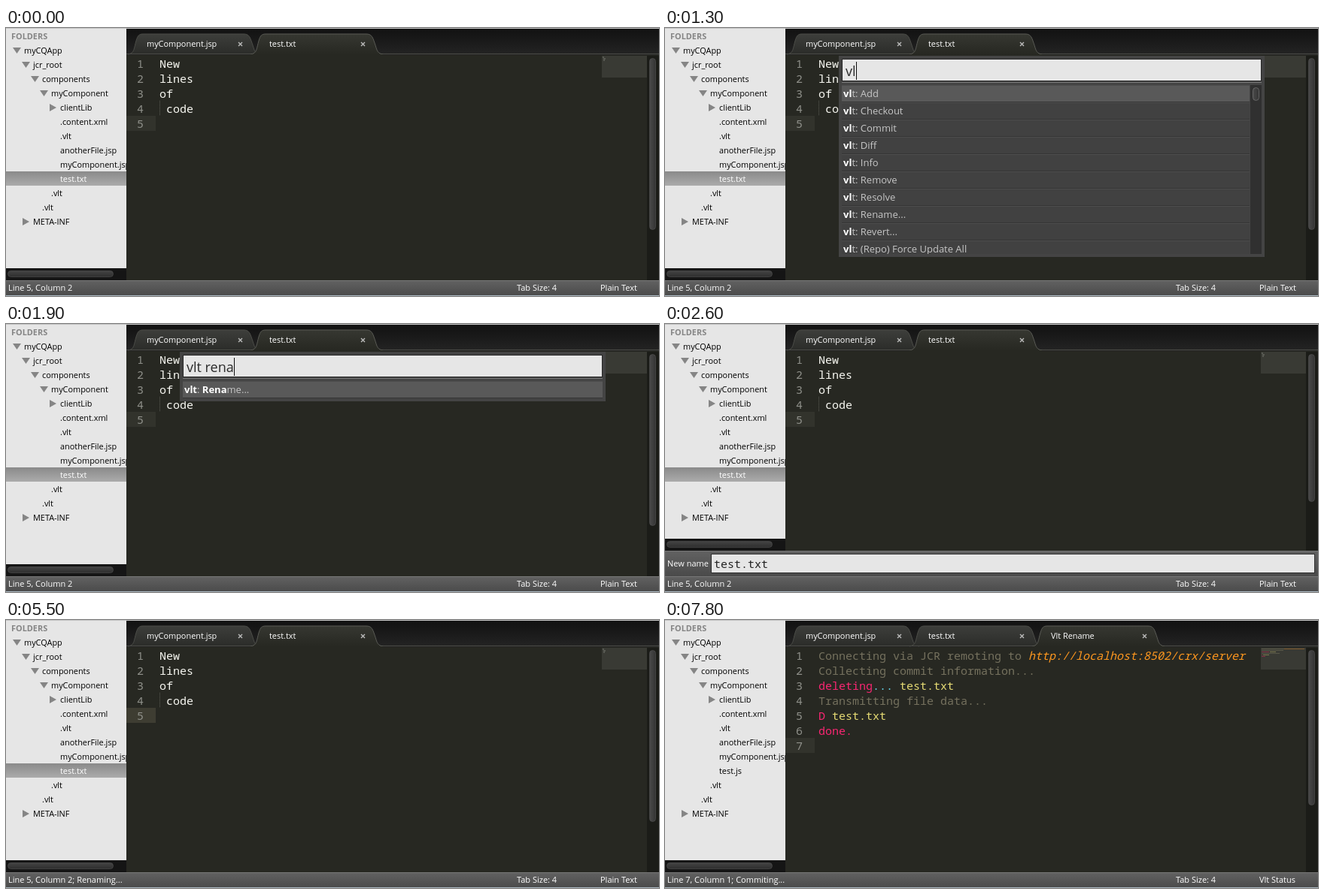
Animation, 868 px wide and 357 px high, one loop 7900 ms. Source, as an HTML page:

```html
<!DOCTYPE html>
<html lang="en">
<head>
<meta charset="utf-8">
<title>Renaming a file in the editor</title>
<style>
  html, body { margin: 0; width: 100%; height: 100%; overflow: hidden; background: #272822; }
  svg { display: block; width: 868px; height: 357px; }
  text { font: 11px "Open Sans", "Noto Sans", sans-serif; white-space: pre; }
  .tree { font-size: 10.9px; fill: #000; }
  .head { font-weight: 700; fill: #858585; }
  .light { fill: #fff; }
  .item { font-size: 13px; fill: #c6c6c6; }
  .item .hit { font-weight: 700; fill: #fff; }
  .key { font-size: 11.5px; fill: #f4f4f4; text-anchor: end; }
  .query { font-size: 18px; fill: #2a2a2a; }
  .code { font: 15px "Noto Sans Mono", "DejaVu Sans Mono", monospace; fill: #f8f8f2; }
  .code.num { fill: #8f908a; text-anchor: end; }
  .code.field { fill: #222; }
  .dim { fill: #75715e; }
  .link { fill: #fd971f; font-style: italic; }
  .pink { fill: #f92672; }
  .blue { fill: #66d9ef; }
  .gold { fill: #e6db74; }
</style>
</head>
<body>
<svg viewBox="0 0 868 357">
  <defs>
    <linearGradient id="bar" x2="0" y2="1"><stop stop-color="#626262"/><stop offset="1" stop-color="#4a4a4a"/></linearGradient>
    <linearGradient id="picked" x2="0" y2="1"><stop stop-color="#8a8a8a"/><stop offset="1" stop-color="#ababab"/></linearGradient>
    <linearGradient id="tabBar" x2="0" y2="1"><stop stop-color="#111"/><stop offset="1" stop-color="#242424"/></linearGradient>
    <linearGradient id="idle" x2="0" y2="1"><stop stop-color="#3d3e3b"/><stop offset="1" stop-color="#2b2c29"/></linearGradient>
    <linearGradient id="active" x2="0" y2="1"><stop stop-color="#363731"/><stop offset="1" stop-color="#272822"/></linearGradient>
    <linearGradient id="thumbH" x2="0" y2="1"><stop stop-color="#444"/><stop offset="1" stop-color="#2e2e2e"/></linearGradient>
    <linearGradient id="thumbV"><stop stop-color="#4a4a4a"/><stop offset="1" stop-color="#343434"/></linearGradient>
    <clipPath id="side"><rect width="160" height="336"/></clipPath>
    <clipPath id="list"><rect x="231" y="74" width="566" height="227"/></clipPath>
  </defs>
  <g id="stage"></g>
</svg>
<script>
const LOOP = 7900;
const stage = document.getElementById('stage');

// Latest value whose start time has passed.
const at = (t, steps) => steps.reduce((v, [from, next]) => t >= from ? next : v, null);
const rect = (x, y, w, h, fill, more = '') =>
  `<rect x="${x}" y="${y}" width="${w}" height="${h}" fill="${fill}" ${more}/>`;
const text = (x, y, cls, s) => `<text x="${x}" y="${y}" class="${cls}">${s}</text>`;
const span = (cls, s) => `<tspan class="${cls}">${s}</tspan>`;

const plain = ['New', 'lines', 'of', ' code', ''];
const log = [
  span('dim', 'Connecting via JCR remoting to ') + span('link', 'http://localhost:8502/crx/server'),
  span('dim', 'Collecting commit information...'),
  span('pink', 'deleting') + span('blue', '...') + span('gold', ' test.txt'),
  span('dim', 'Transmitting file data...'),
  span('pink', 'D') + span('gold', ' test.txt'),
  span('pink', 'done.'),
  ''
];

// Asterisks mark the matched letters; a bar separates the shortcut.
const vlt = (q, name, n = 0) => {
  const hit = n ? name.replace(/\w+/, w => `*${w.slice(0, n)}*${w.slice(n)}`) : name;
  return `*${'vlt'.slice(0, q)}*${'vlt'.slice(q)}: ${hit}`;
};
const emmet = tail => `Emmet: E*v*a*l*uate Ma*t*h ${tail}|Ctrl+Shift+Y`;
const reNames = ['Remove', 'Resolve', 'Rename...', 'Revert...', '(Repo) Force Update All'];
const allNames = ['Add', 'Checkout', 'Commit', 'Diff', 'Info', ...reNames];
const every = q => allNames.map(n => vlt(q, n));
const start = [
  'About', 'Bookmarks: Clear All|Ctrl+Shift+F2', 'Bookmarks: Select All|Alt+F2',
  'Bookmarks: Select Next|F2', 'Bookmarks: Select Previous|Shift+F2',
  'Bookmarks: Toggle|Ctrl+F2', 'Build: Build|Ctrl+B', 'Build: Build and full deploy',
  'Build: Cancel|Ctrl+Break', 'Build: Clean'
];
const results = {
  '': start, 'v': every(1), 'vl': every(2), 'vlt': every(3),
  'vlt r': [...reNames.map(n => vlt(3, n, 1)), emmet('Exp*r*ession')],
  'vlt re': [...reNames.map(n => vlt(3, n, 2)), emmet('Exp*re*ssion')],
  'vlt ren': [vlt(3, 'Rename...', 3), emmet('Exp*re*ssio*n*')],
  'vlt rena': [vlt(3, 'Rename...', 4)]
};

function state(t) {
  return {
    query: at(t, [[900, ''], [1200, 'v'], [1300, 'vl'], [1400, 'vlt'], [1500, 'vlt r'],
      [1600, 'vlt re'], [1700, 'vlt ren'], [1900, 'vlt rena'], [2100, null]]),
    name: at(t, [[2100, 'test.txt'], [2800, 'test.tx'], [2900, 'test.t'], [3300, 'test.'],
      [3800, 'test.j'], [3900, 'test.js'], [5500, null]]),
    nameCaret: at(t, [[0, 1], [2500, .5], [2600, 0], [2800, 1], [3600, .5], [3700, 0], [3800, 1]]),
    caret: at(t, [[0, 0], [200, 1], [600, .5], [700, 0], [5900, 1], [6300, .5], [6400, 0],
      [7000, 1], [7200, .6], [7300, .3], [7400, 0]]),
    lines: at(t, [[0, plain], [6900, ['']], [7000, log]]),
    tabs: t < 6900 ? 2 : 3,
    renamed: t >= 5800,
    focus: t >= 5500 && t < 7800,
    job: at(t, [[0, ''], [5500, '; Renaming...'], [5900, '; Commiting...']])
  };
}

function sidebar(s, foot) {
  const rows = [['myCQApp', 24, 'v'], ['jcr_root', 36, 'v'], ['components', 48, 'v'],
    ['myComponent', 60, 'v'], ['clientLib', 72, '>'], ['.content.xml', 72], ['.vlt', 72],
    ['anotherFile.jsp', 72], ['myComponent.jsp', 72], [s.renamed ? 'test.js' : 'test.txt', 72],
    ['.vlt', 60], ['.vlt', 48], ['META-INF', 36, '>']];
  let out = rect(0, 0, 160, foot, '#e6e6e6') + text(7, 15, 'tree head', 'FOLDERS');
  if (!s.renamed) out += rect(0, 191, 160, 19, 'url(#picked)');
  rows.forEach(([label, x, arrow], i) => {
    const y = 30 + 19 * i;
    const light = i === 9 && !s.renamed ? ' light' : '';
    if (arrow) {
      const d = arrow === 'v' ? `M${x - 15} ${y - 4}h11l-5.5 8z` : `M${x - 14} ${y - 5}v10l9-5z`;
      out += `<path d="${d}" fill="#858585"/>`;
    }
    out += text(x, y + 4, 'tree' + light, label);
  });
  return `<g clip-path="url(#side)">${out}</g>` +
    rect(0, foot, 160, 17, '#151515') +
    rect(2.5, foot + 3.5, 140, 8, 'url(#thumbH)', 'rx="4" stroke="#4c4c4c" stroke-width=".7"');
}

function tab(i, label, on) {
  const x = 162 + 163 * i;
  const shape = `M${x} 35c9-1 8-8 11-18c2-7 4-9 9-9h134c6 0 8 3 10 9c4 10 3 17 12 18`;
  const cx = x + 149.5;
  return `<path d="${shape}" fill="url(#${on ? 'active' : 'idle'})" stroke="${on ? '#5a5b55' : '#4c4d48'}"/>` +
    text(x + 25, 25, 'tree light', label) +
    `<path d="M${cx - 2.5} 19l5 5m0-5l-5 5" stroke="#bbb" stroke-width="1.4"/>`;
}

function tabs(s) {
  const labels = ['myComponent.jsp', 'test.txt', 'Vlt Rename'].slice(0, s.tabs);
  const last = labels.length - 1;
  const left = 162 + 163 * last;
  return rect(160, 0, 708, 36, 'url(#tabBar)') +
    labels.map((l, i) => i < last ? tab(i, l, false) : '').join('') +
    rect(160, 34, 708, 1, '#4a4b46') + tab(last, labels[last], true) +
    rect(left, 35, 176, 2, '#272822');
}

function minimap(s) {
  let out = rect(792, 37, 60, 29, '#393a34');
  if (s.tabs === 2) return out + `<path d="M793 39h2m-1 2h3m-3 2h2" stroke="#777870"/>`;
  if (s.lines !== log) return out;
  const marks = [[793, 38, 30, '#65624f'], [823, 38, 27, '#9b672e'], [793, 40, 29, '#65624f'],
    [793, 42, 10, '#a23050'], [804, 42, 8, '#928d59'], [793, 44, 24, '#65624f'],
    [793, 46, 1, '#a23050'], [795, 46, 8, '#928d59'], [793, 48, 5, '#a23050']];
  marks.forEach(([x, y, w, c]) => out += rect(x, y, w, 1, c, 'opacity=".75"'));
  return out;
}

function editor(s, foot) {
  const n = s.lines.length;
  const row = 37 + 20 * (n - 1);
  let out = rect(160, 35, 708, foot - 35, '#272822') + tabs(s) +
    rect(160, row, 39, 20, s.focus ? '#3e3d32' : '#32332c');
  s.lines.forEach((line, i) => {
    const y = 53 + 20 * i;
    out += text(183, y, 'code num', i + 1) + text(204, y, 'code', line);
  });
  if (s.lines === plain)
    out += '<path d="M204.5 97v20" stroke="#5a5b54" stroke-dasharray="1 1"/>';
  out += rect(s.tabs === 2 ? 212 : 203, row, 1, 20, '#f8f8f0', `opacity="${s.caret}"`);
  const end = s.tabs === 3 ? 246 : s.name === null ? 268 : 236;
  return out + minimap(s) + rect(852, 37, 16, foot - 37, '#1b1c18') +
    rect(855.5, 40.5, 8, end - 40, 'url(#thumbV)', 'rx="4" stroke="#505050" stroke-width=".7"');
}

function palette(s) {
  const items = results[s.query];
  const full = items.length > 9;
  const bottom = Math.min(80 + 23 * items.length, 305);
  const right = full ? 777 : 793;
  const picked = /^vlt re?$/.test(s.query) ? 1 : 0;
  let rows = '';
  items.forEach((item, i) => {
    const y = 76 + 23 * i;
    const [label, key] = item.split('|');
    rows += rect(235, y, right - 235, 23, i === picked ? '#595959' : '#414141') +
      rect(235, y + 22, right - 235, 1, '#353535') + rect(235, y, right - 235, 1, '#4d4d4d') +
      text(237, y + 16, 'item', label.replace(/\*(.*?)\*/g, (_, hit) => span('hit', hit)));
    if (key) rows += text(right - 2, y + 15, 'key', key);
  });
  if (full) rows += rect(778, 76, 15, 225, '#303030') +
    rect(781.5, 79.5, 8, 17, 'url(#thumbV)', 'rx="4" stroke="#777" stroke-width=".7"');
  return rect(231, 37, 566, bottom - 37, '#444') +
    rect(235.5, 41.5, 557, 29, '#e6e6e6', 'stroke="#262626"') +
    rect(235, 72, 558, 1, '#777') + `<g clip-path="url(#list)">${rows}</g>` +
    text(240, 64, 'query', s.query) + rect(239, 45, 1, 24, '#111', 'id="queryCaret"');
}

function renamePanel(s) {
  return rect(0, 302, 868, 34, 'url(#bar)') + rect(0, 302, 868, 1, '#777') +
    text(3, 323, 'light', 'New name') +
    rect(61.5, 306.5, 802, 25, '#e6e6e6', 'stroke="#303030"') +
    text(65, 325, 'code field', s.name) +
    rect(65 + 9 * s.name.length, 309, 1, 20, '#111', `opacity="${s.nameCaret}"`);
}

function statusBar(s) {
  const pos = s.tabs === 2 ? 'Line 5, Column 2' : `Line ${s.lines.length}, Column 1`;
  return rect(0, 336, 868, 21, 'url(#bar)') + rect(0, 336, 868, 1, '#777') +
    text(3, 350, 'light', pos + s.job) + text(679, 350, 'light', 'Tab Size: 4') +
    text(790, 350, 'light', s.tabs === 2 ? 'Plain Text' : 'Vlt Status') +
    rect(0, 356, 868, 1, '#aab7c0');
}

function render(s) {
  const foot = s.name === null ? 336 : 302;
  stage.innerHTML = editor(s, foot) + sidebar(s, foot - 16) +
    (s.query === null ? '' : palette(s)) + (s.name === null ? '' : renamePanel(s)) +
    statusBar(s) + rect(0, 0, 868, 1, '#c4c4c4');
  if (s.query) {
    const width = stage.querySelector('.query').getComputedTextLength();
    stage.querySelector('#queryCaret').setAttribute('x', Math.round(240 + width));
  }
}

const begun = performance.now();
let shown = '';
function tick() {
  const s = state((performance.now() - begun) % LOOP);
  const key = JSON.stringify(s);
  if (key !== shown) {
    shown = key;
    render(s);
  }
  requestAnimationFrame(tick);
}
tick();
</script>
</body>
</html>
```
